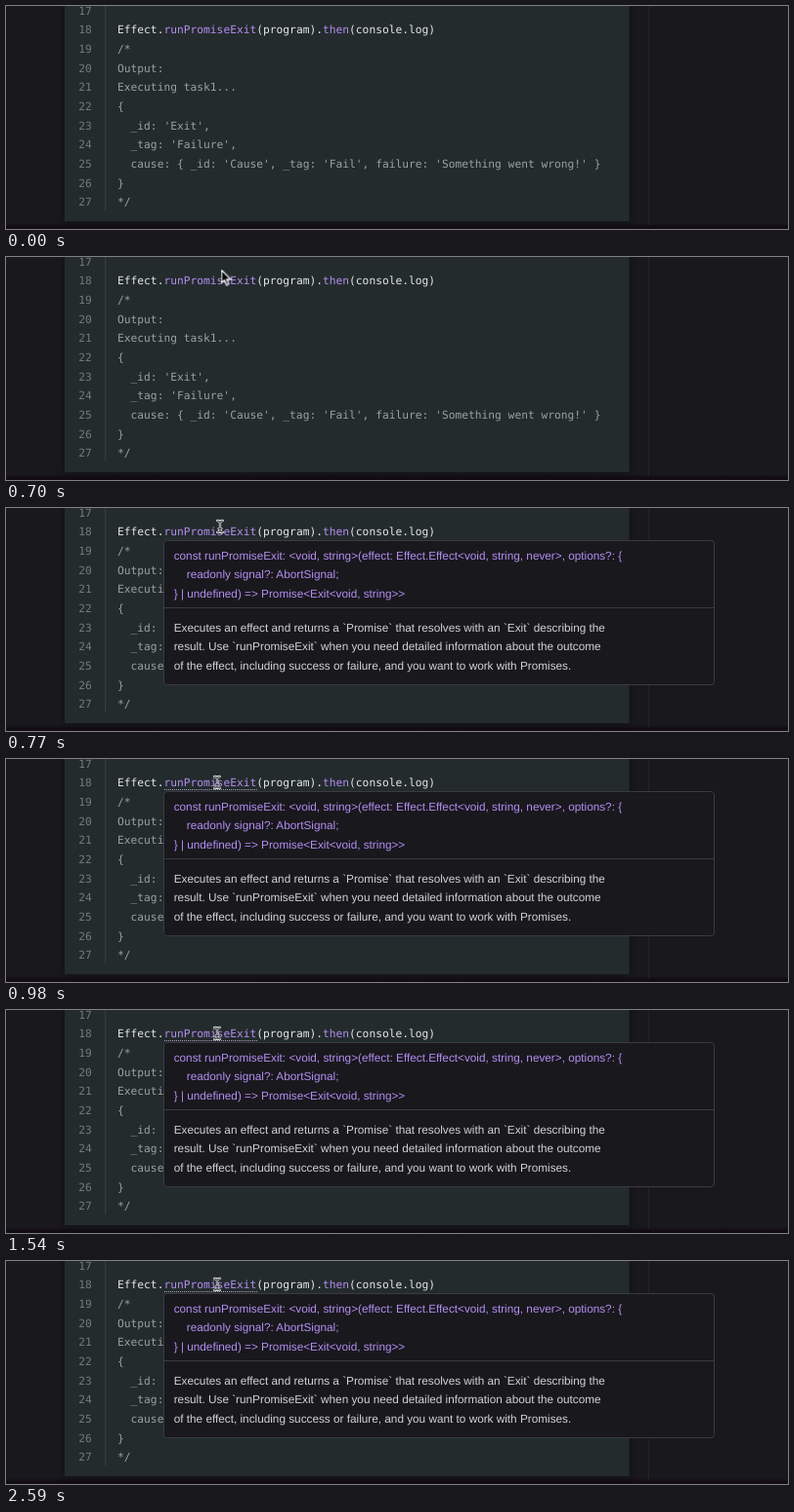
Animation, 800 px wide and 229 px high, one loop 3.22 s. Source, as an HTML page:

```html
<!DOCTYPE html>
<html lang="en">
<head>
<meta charset="utf-8">
<title>Type hover</title>
<style>
  html, body { margin: 0; width: 100%; height: 100%; overflow: hidden; background: #19181d; }
  svg { display: block; width: 800px; height: 229px; }
  text { white-space: pre; text-rendering: geometricPrecision; font-variant-ligatures: none; }
  .code { font: 11.26px "DejaVu Sans Mono", monospace; fill: #e4e7e7; }
  .code .num { fill: #737a7c; text-anchor: end; }
  .code .note { fill: #9ba1a1; }
  .code .call { fill: #b48eee; }
  .tip { font: 11.77px "Liberation Sans", Arial, sans-serif; fill: #d3d3d6; }
  .tip .type { fill: #b48ef2; }
  #panel { filter: drop-shadow(0 0 3px rgba(0, 0, 0, .45)); }
  #arrow, #beam, #tip, #underline { opacity: 0; }
</style>
</head>
<body>
<svg viewBox="0 0 800 229">
  <defs>
    <linearGradient id="floor" x2="0" y2="1">
      <stop offset="0" stop-color="#19181d"/>
      <stop offset=".6" stop-color="#110c14"/>
      <stop offset="1" stop-color="#150c16"/>
    </linearGradient>
    <path id="stem" d="M-2.7 -6Q0 -6 0 -4.2Q0 -6 2.7 -6M0 -4.2V4.2M-2.7 6Q0 6 0 4.2Q0 6 2.7 6M-1.4 2.3H1.4"/>
  </defs>
  <rect width="800" height="229" fill="#19181d"/>
  <rect y="223" width="800" height="6" fill="url(#floor)"/>
  <rect x="657" width="1" height="225" fill="#232227"/>
  <rect id="panel" x="60" y="-10" width="577.6" height="231" fill="#232b2d"/>
  <rect x="101" width="1.2" height="210" fill="#353d3f"/>
  <g id="code" class="code"></g>
  <path id="underline" d="M162 31.5H257" stroke="#a79bbd" stroke-dasharray="1 1"/>
  <g id="tip" class="tip">
    <rect x="161.5" y="33.5" width="563" height="148" rx="3" fill="#19181d" stroke="#3b3a40"/>
    <path d="M162 102.5H724" stroke="#3b3a40"/>
  </g>
  <path id="arrow" d="M0 0V13L3 10.2L5.2 15.2L7.4 14.2L5.2 9.4H9.4Z" fill="#050505" stroke="#fff" stroke-width="1.2" stroke-linejoin="round"/>
  <g id="beam" fill="none" stroke-linecap="round">
    <use href="#stem" stroke="#fff" stroke-width="2.3"/>
    <use href="#stem" stroke="#111" stroke-width=".9"/>
  </g>
</svg>
<script>
const LOOP = 3220, PITCH = 19.66;
const $ = id => document.getElementById(id);

function make(parent, tag, text, cls, attrs = {}) {
  const el = document.createElementNS('http://www.w3.org/2000/svg', tag);
  el.textContent = text;
  if (cls) el.setAttribute('class', cls);
  for (const key in attrs) el.setAttribute(key, attrs[key]);
  return parent.appendChild(el);
}

const lines = [
  '', '', '/*', 'Output:', 'Executing task1...', '{',
  "  _id: 'Exit',",
  "  _tag: 'Failure',",
  "  cause: { _id: 'Cause', _tag: 'Fail', failure: 'Something went wrong!' }",
  '}', '*/'
];
lines.forEach((line, i) => {
  const y = 28.4 + (i - 1) * PITCH;
  make($('code'), 'text', 17 + i, 'num', { x: 87.7, y });
  if (line) make($('code'), 'text', line, 'note', { x: 114, y });
});

const call = make($('code'), 'text', '', '', { x: 114, y: 28.4 });
[['Effect.'], ['runPromiseExit', 'call'], ['(program).'], ['then', 'call'], ['(console.log)']]
  .forEach(([text, cls]) => make(call, 'tspan', text, cls));

function paragraph(rows, top, cls) {
  rows.forEach((row, i) => make($('tip'), 'text', row, cls, { x: 171.7, y: top + i * PITCH }));
}
paragraph([
  'const runPromiseExit: <void, string>(effect: Effect.Effect<void, string, never>, options?: {',
  '    readonly signal?: AbortSignal;',
  '} | undefined) => Promise<Exit<void, string>>'
], 52.6, 'type');
paragraph([
  'Executes an effect and returns a `Promise` that resolves with an `Exit` describing the',
  'result. Use `runPromiseExit` when you need detailed information about the outcome',
  'of the effect, including success or failure, and you want to work with Promises.'
], 126.8);

// Each step is [ms, opacity, x, y] and holds until the next one.
function play(id, steps) {
  const frames = [[0, 0, steps[0][2], steps[0][3]], ...steps].map(([ms, opacity, x = 0, y = 0]) => ({
    offset: ms / LOOP, opacity, transform: `translate(${x}px, ${y}px)`, easing: 'step-end'
  }));
  frames.push({ ...frames[frames.length - 1], offset: 1 });
  $(id).animate(frames, { duration: LOOP, iterations: Infinity });
}

play('arrow', [[420, 1, 229, -13], [490, 1, 226, -7], [560, 1, 224, -1], [630, 1, 222, 6], [700, 1, 220.5, 13.5], [770, 0, 219, 19]]);
play('beam', [[770, 1, 219, 19], [840, 1, 217.5, 22], [910, 1, 216.5, 23.5], [980, 1, 216, 24]]);
play('tip', [[770, 1]]);
play('underline', [[770, .1], [840, .45], [910, .8], [980, 1]]);
</script>
</body>
</html>
```
